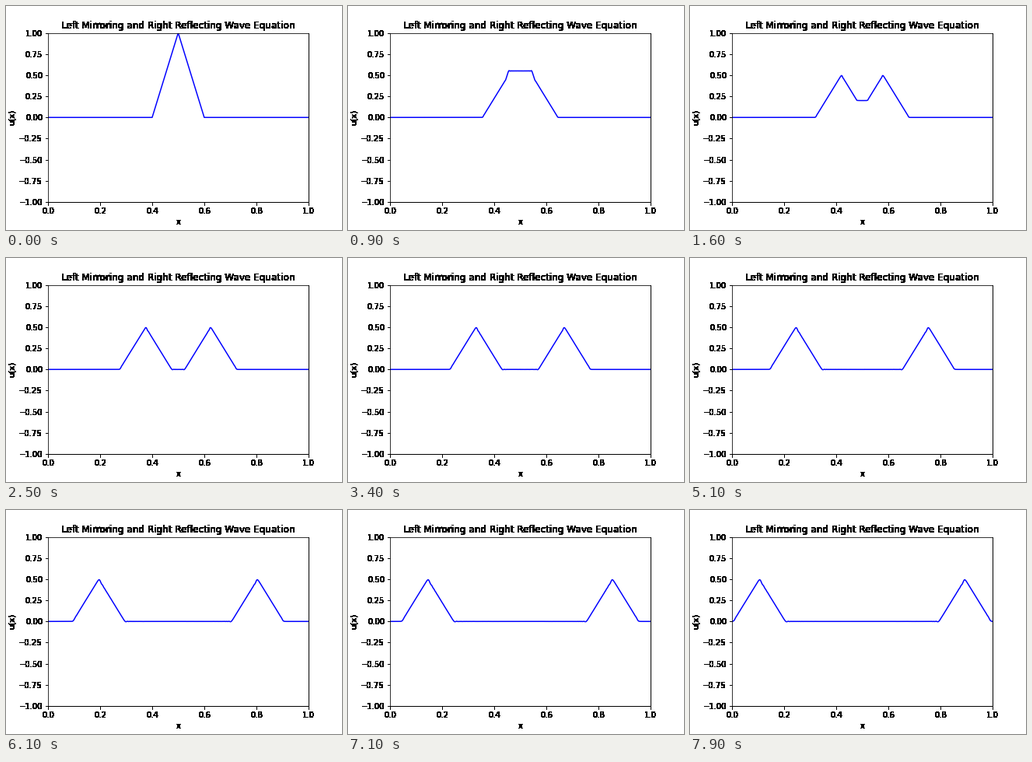
A matplotlib script for the animation above (8000 ms loop, 432 by 288 pixels).

```python
import numpy as np
import matplotlib.pyplot as plt
from matplotlib.animation import FuncAnimation

FRAMES, INTERVAL = 80, 100
CELLS, STEPS = 1000, 10     # grid cells, time steps per frame
COURANT = 0.5               # wave speed * dt / dx


def laplacian(u):
    lap = np.zeros_like(u)
    lap[1:-1] = u[2:] - 2 * u[1:-1] + u[:-2]
    lap[0] = 2 * (u[1] - u[0])      # mirroring left end, fixed right end
    return lap


def solve(u):
    """Leapfrog solution of the wave equation, one row per frame."""
    c2 = COURANT ** 2
    prev, cur = u + c2 / 2 * laplacian(u), u
    rows = [u]
    for _ in range(FRAMES - 1):
        for _ in range(STEPS):
            prev, cur = cur, 2 * cur - prev + c2 * laplacian(cur)
        rows.append(cur)
    return rows


def solid_text_backdrop(fig):
    """Render on a clear ground and drop the alpha, so soft edges turn solid."""
    fig.set_facecolor((1, 1, 1, 0))
    fig.canvas.draw()
    rgba = np.array(fig.canvas.buffer_rgba())
    rgba[rgba[..., 3] == 0] = 255
    fig.set_facecolor("white")
    return rgba[..., :3]


plt.rcParams.update({"font.family": "DejaVu Sans", "font.size": 10})

fig = plt.figure(figsize=(6, 4), dpi=72)
ax = fig.add_axes([0.125, 0.125, 0.775, 0.755])
ax.set(xlim=(0, 1), ylim=(-1, 1), xlabel="x", ylabel="u(x)",
       title="Left Mirroring and Right Reflecting Wave Equation")
fig.figimage(solid_text_backdrop(fig), zorder=-1)

x = np.linspace(0, 1, CELLS + 1)
waves = solve(np.maximum(0, 1 - np.abs(x - 0.5) / 0.1))
line, = ax.plot(x, waves[0], color="blue", lw=1.5)


def update(i):
    line.set_ydata(waves[i])
    return line,


anim = FuncAnimation(fig, update, frames=FRAMES, interval=INTERVAL,
                     repeat=True, repeat_delay=0)
plt.show()
```
